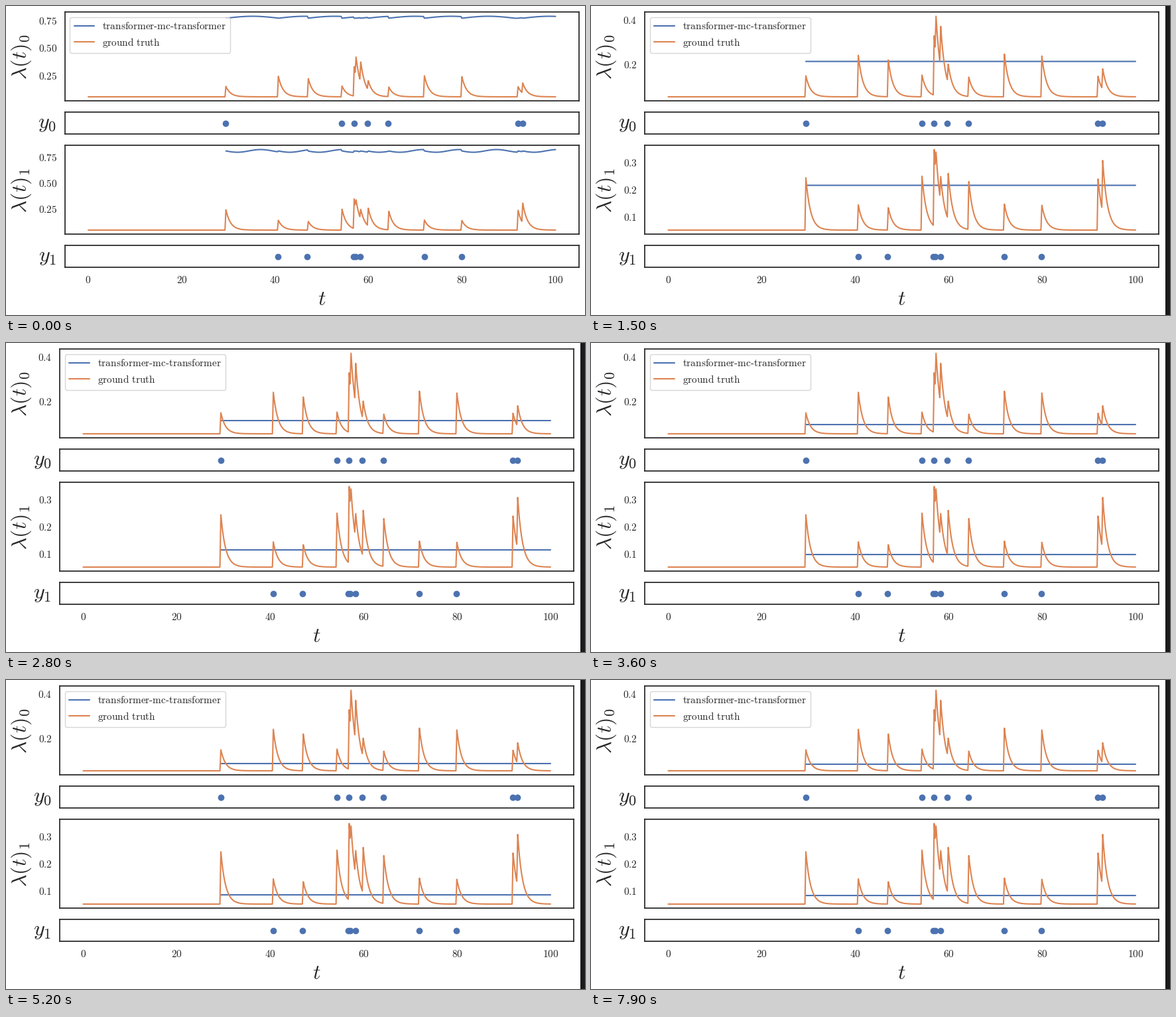
A matplotlib script that plays this animation: 873 px wide and 466 px high, repeating every 8000 ms.

```python
import numpy as np
import matplotlib.pyplot as plt
from matplotlib.animation import FuncAnimation
from matplotlib.patches import Rectangle
from matplotlib.ticker import MaxNLocator
from matplotlib.transforms import Affine2D

W, H, DPI = 873, 466, 100
FRAMES, INTERVAL = 80, 100
BLUE, ORANGE, INK = "#4C72B0", "#DD8452", "#262626"

plt.rcParams.update({
    "mathtext.fontset": "cm", "font.size": 11, "text.color": INK,
    "axes.edgecolor": INK, "axes.linewidth": 1.25,
    "xtick.labelcolor": INK, "ytick.labelcolor": INK,
    "lines.linewidth": 1.5, "lines.solid_capstyle": "round",
})

# Two-dimensional Hawkes process with exponential decay
EVENTS = [
    np.array([29.4, 54.28, 56.88, 59.73, 64.18, 91.9, 92.9]),
    np.array([40.61, 46.9, 56.75, 57.2, 58.23, 71.9, 79.87]),
]
BASE = [0.055, 0.05]
JUMP = [[0.1, 0.2], [0.205, 0.1]]
t = np.linspace(0, 100, 500)


def intensity(i):
    lam = np.full_like(t, BASE[i])
    for j, times in enumerate(EVENTS):
        for s in times:
            lam += np.where(t >= s, JUMP[i][j] * np.exp(-np.maximum(t - s, 0)), 0)
    return lam


truth = [intensity(0), intensity(1)]

# The estimate starts at the first event
all_events = np.sort(np.concatenate(EVENTS))
te = t[t >= all_events[0]]
since = te - all_events[np.searchsorted(all_events, te, side="right") - 1]
WAVE = [0.018 * np.sin(np.pi * np.minimum(since / 11.5, 1)),
        -0.013 * np.sin(2 * np.pi * since / 10)]

# Level of the estimate above its limit, interpolated in log space
STEPS = [0, 6, 15, 28, 44, 61, 79]
LIMIT = [0.0835, 0.0825]
EXCESS = [[0.6865, 0.3475, 0.1303, 0.031, 0.0056, 0.0011, 0.0003],
          [0.7245, 0.3545, 0.133, 0.0312, 0.0055, 0.0009, 0.0003]]


def estimate(i, n):
    level = LIMIT[i] + np.exp(np.interp(n, STEPS, np.log(EXCESS[i])))
    return level + WAVE[i] * np.exp(-0.7 * n)


fig = plt.figure(figsize=(W / DPI, H / DPI), dpi=DPI, facecolor="white")
LEFT_WIDE, LEFT_SLIM, AX_W = 88.8, 81.2, 775
ROWS = [(9.4, 143), (160, 193), (210.4, 344), (361, 394)]

# Pixel coordinates with y down; the slid version follows the axes
pixels = Affine2D().scale(1, -1).translate(0, H)
slide = Affine2D()


def place(ax, row, left):
    top, bottom = row
    ax.set_position([left / W, 1 - bottom / H, AX_W / W, (bottom - top) / H])


def label(x, y, s, trans, **kw):
    fig.text(x, y, s, transform=trans, fontsize=23, va="baseline", **kw)


axes = [fig.add_axes([0, k / 4, 1, 0.2]) for k in range(4)]
for ax in axes:
    ax.set_xlim(-5, 105)
    ax.set_xticks([])
    ax.set_yticks([])
    ax.tick_params(length=0)

curves = []
for i in range(2):
    ax, dots = axes[2 * i], axes[2 * i + 1]
    ax.tick_params(axis="y", pad=8.4)
    blue, = ax.plot(te, te * 0, color=BLUE, label=r"$\text{transformer-mc-transformer}$")
    ax.plot(t, truth[i], color=ORANGE, label=r"$\mathrm{ground\ truth}$")
    curves.append(blue)
    dots.plot(EVENTS[i], 0 * EVENTS[i], "o", color=BLUE, ms=7, mew=0)
    dots.set_ylim(-1, 1)
    label(31, sum(ROWS[2 * i]) / 2 + 0.5, rf"$\lambda(t)_{i}$", pixels,
          ha="center", rotation=90, rotation_mode="anchor")
    label(68.5, ROWS[2 * i + 1][1] - 9, f"$y_{i}$", slide + pixels, ha="right")

axes[0].legend(loc="upper left", framealpha=0.8, edgecolor="0.8")
ticks = range(0, 101, 20)
axes[3].set_xticks(ticks, [f"${v}$" for v in ticks])
axes[3].tick_params(axis="x", pad=8.9)
label(468.7, 451, "$t$", slide + pixels, ha="center")

band = Rectangle((866, 0), W - 866, H, transform=pixels, color="#1b1b1e", lw=0)
fig.add_artist(band)

locator = MaxNLocator(3, steps=[1, 2, 2.5, 5, 10], min_n_ticks=2)


def update(n):
    wide = False
    for i, curve in enumerate(curves):
        y = estimate(i, n)
        curve.set_ydata(y)
        low, high = truth[i].min(), max(truth[i].max(), y.max())
        pad = 0.05 * (high - low)
        low, high = low - pad, high + pad
        marks = [v for v in locator.tick_values(low, high) if low <= v <= high]
        quarter = abs(marks[1] - marks[0] - 0.25) < 1e-6
        wide |= quarter
        axes[2 * i].set_ylim(low, high)
        axes[2 * i].set_yticks(marks, [f"${v:.{2 if quarter else 1}f}$" for v in marks])
    left = LEFT_WIDE if wide else LEFT_SLIM
    for ax, row in zip(axes, ROWS):
        place(ax, row, left)
    slide.clear().translate(left - LEFT_SLIM, 0)
    band.set_visible(not wide)
    return curves


anim = FuncAnimation(fig, update, frames=FRAMES, interval=INTERVAL,
                     repeat=True, repeat_delay=0, blit=False)
plt.show()
```
